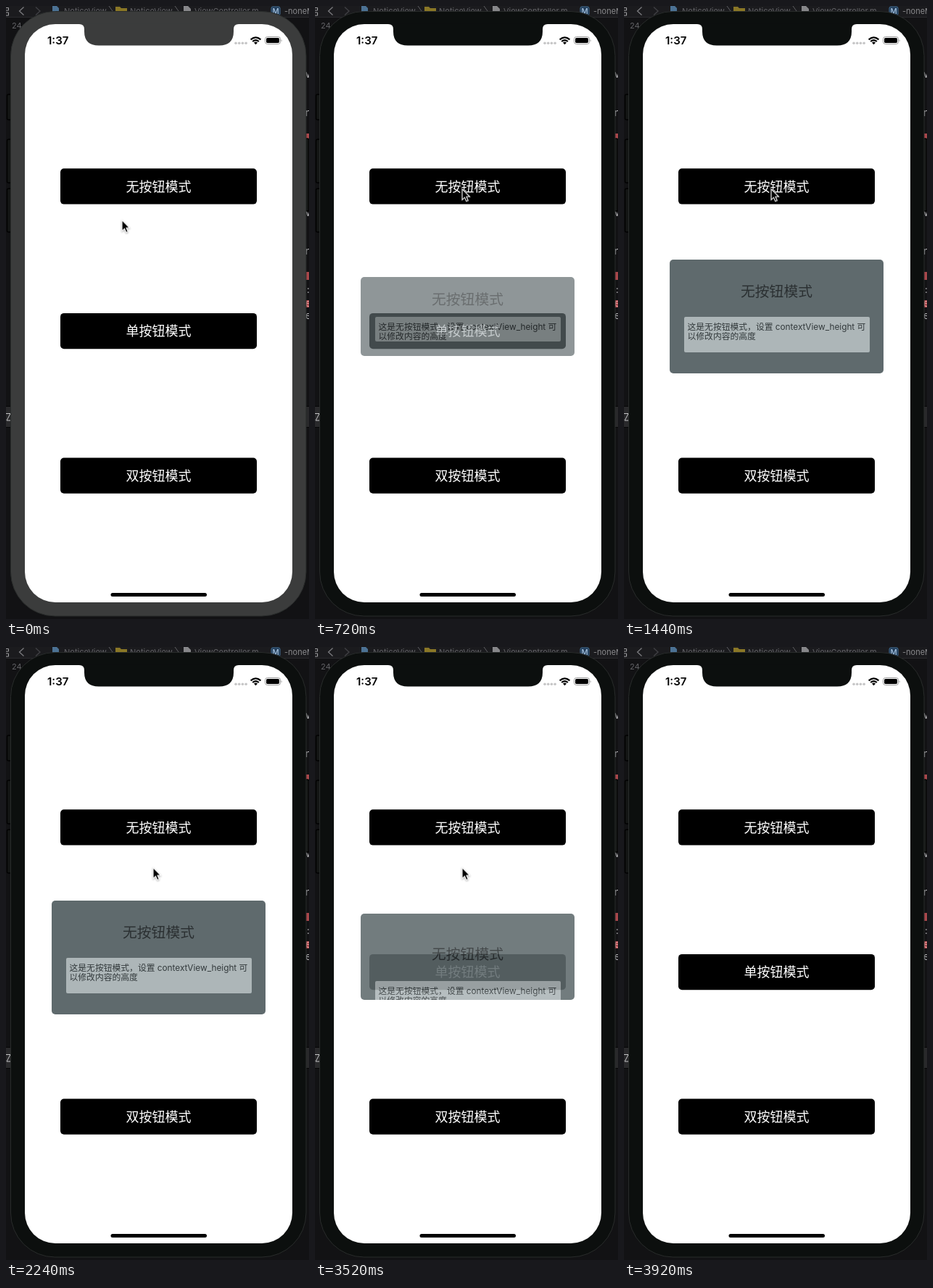
Animation of 418x846 px, one loop 4.16 s. Source, as an HTML page:

```html
<!DOCTYPE html>
<html lang="zh-CN">
<head>
<meta charset="utf-8">
<title>弹窗演示</title>
<style>
html, body { margin: 0; width: 100%; height: 100%; overflow: hidden; background: #121214; }
body { position: relative; font-family: Inter, "Noto Sans CJK SC", "Noto Sans CJK", sans-serif; }
svg { position: absolute; left: 0; top: 0; display: block; }
.bezel, .popup, .title, .content, .cursor { animation: 4160ms step-end infinite; }

.bezel { animation-name: activate; }
@keyframes activate {
  0% { color: #3b3c3c; }
  1.92%, 100% { color: #0c0f0e; }
}

.bar { font-size: 11px; fill: #626266; }
.code { font-size: 13px; fill: #b9b9bc; }
.label { font-size: 18px; fill: #fff; text-anchor: middle; }
.clock { font-size: 15px; font-weight: 600; fill: #000; }

.popup {
  position: absolute; left: 63px; width: 295px;
  overflow: hidden; border-radius: 5px; background: #5f6a6d;
  animation-name: popup;
}
.title {
  position: absolute; left: 0; width: 100%; top: 28%;
  transform: translateY(-50%);
  text-align: center; font-size: 19.8px; font-weight: 500; line-height: 28px;
  color: #2b3032; white-space: nowrap;
  animation-name: title;
}
.content {
  position: absolute; left: 19.5px; width: 256px; top: 50%; height: 31.2%;
  box-sizing: border-box; padding: 8px 0 0 5px; overflow: hidden;
  border-radius: 2px; background: #adb6b8; color: #333a3c;
  font-size: 11.8px; line-height: 13.5px; white-space: nowrap;
  animation-name: content;
}
/* springs open past its height, then collapses while fading */
@keyframes popup {
  0% { top: 428.5px; height: 0; opacity: 0; }
  15.38% { top: 408px; height: 41px; opacity: .3; }
  17.3% { top: 374px; height: 109px; opacity: .7; }
  19.23% { top: 354.5px; height: 148px; opacity: .92; }
  21.15% { top: 349.5px; height: 158px; opacity: 1; }
  23.07% { top: 348.5px; height: 160px; opacity: 1; }
  25% { top: 349.5px; height: 158px; opacity: 1; }
  26.92% { top: 350.3px; height: 157px; opacity: 1; }
  84.61% { top: 368px; height: 119px; opacity: .88; }
  86.53% { top: 392px; height: 68px; opacity: .65; }
  88.46% { top: 408px; height: 34px; opacity: .4; }
  90.38% { top: 417px; height: 14px; opacity: .2; }
  92.3% { top: 421px; height: 5px; opacity: .08; }
  94.23%, 100% { top: 424px; height: 0; opacity: 0; }
}
@keyframes title {
  0% { top: 28%; }
  84.61% { top: 47%; }
  86.53% { top: 90%; }
  88.46%, 100% { top: 180%; }
}
@keyframes content {
  0% { top: 50%; }
  84.61% { top: 78%; }
  86.53%, 100% { top: 100%; }
}

.cursor { overflow: visible; filter: drop-shadow(0 1px 1px rgba(0, 0, 0, .35)); animation-name: cursor; }
@keyframes cursor {
  0% { transform: translate(160px, 295.5px); visibility: visible; animation-timing-function: steps(7); }
  13.46% { transform: translate(203px, 252.5px); animation-timing-function: step-end; }
  40.38% { transform: translate(203px, 252.5px); animation-timing-function: steps(5); }
  50% { transform: translate(203px, 304.5px); visibility: visible; animation-timing-function: step-end; }
  94.23%, 100% { transform: translate(203px, 304.5px); visibility: hidden; }
}
</style>
</head>
<body>
<svg width="418" height="846" viewBox="0 0 418 846">
  <!-- editor behind the phone -->
  <rect width="418" height="846" fill="#121214"/>
  <rect width="418" height="15" fill="#1b1b1e"/>
  <path d="M0 15.5H418" stroke="#29292c"/>
  <rect y="553" width="418" height="28" fill="#29292b"/>
  <path d="M0 552.5H418M0 581.5H418" stroke="#050506"/>
  <path d="M0 2.5H3.5V6H0M0 9H3.5V13H0" fill="none" stroke="#a0a0a3"/>
  <path d="M24.5 1.5L18.5 7L24.5 12.5" fill="none" stroke="#7b7b7f" stroke-width="1.3"/>
  <path d="M41 1.5L47 7L41 12.5" fill="none" stroke="#414145" stroke-width="1.3"/>
  <path d="M64 0H70L73 3V11H64Z" fill="#4c7294"/>
  <path d="M151 1H157L159 3H167V12H151Z" fill="#8a7726"/>
  <path d="M245 0H251L255 4V12H245Z" fill="#87878a"/>
  <path d="M142 0L147 7M233 0L238 7" stroke="#5c5c60"/>
  <g class="bar">
    <text x="80" y="11">NoticeView</text>
    <text x="171" y="11">NoticeView</text>
    <text x="260" y="11">ViewController.m</text>
    <text x="384" y="11" fill="#88888b">-noneM</text>
    <text x="8" y="31">24</text>
  </g>
  <rect x="366" y="1" width="12" height="12" rx="2" fill="#203a55" stroke="#416b91"/>
  <text x="372" y="11" font-size="10" font-weight="600" text-anchor="middle" fill="#9bb9d7">M</text>
  <g class="code">
    <text x="413" y="99">v</text>
    <text x="413" y="152">n</text>
    <text x="413" y="290">v</text>
    <text x="413" y="343">n</text>
    <text x="415" y="396">:</text>
    <text x="413" y="432">e</text>
  </g>
  <path d="M413 176h5v8h-5zM413 367h5v11h-5zM413 406h5v10h-5z" fill="#a9474b"/>
  <text x="413" y="415" font-size="13" fill="#e4a0a0">e</text>
  <path d="M0 562.5H6L1 572H6" fill="none" stroke="#c5c5c7"/>

  <!-- phone -->
  <g fill="#141615" stroke="#020202" stroke-width="1.5">
    <rect x="1.5" y="122" width="8" height="35" rx="2"/>
    <rect x="1.5" y="184" width="8" height="60" rx="2"/>
    <rect x="1.5" y="252" width="8" height="60" rx="2"/>
    <rect x="410" y="183" width="8" height="100" rx="2"/>
  </g>
  <g class="bezel" fill="currentColor">
    <rect x="6.5" y="7.5" width="407.5" height="834.5" rx="61" stroke="#292c2b"/>
    <rect x="26" y="25" width="369" height="798" rx="42" fill="#fff"/>
    <path d="M101 24.5H321V25Q314 25 314 32V35Q314 54.5 294 54.5H128Q108 54.5 108 35V32Q108 25 101 25Z"/>
  </g>

  <!-- status bar -->
  <text class="clock" x="57" y="53">1:37</text>
  <g fill="#c5c5c6">
    <circle cx="317" cy="51.3" r="1.8"/><circle cx="321.7" cy="51.3" r="1.8"/>
    <circle cx="326.4" cy="51.3" r="1.8"/><circle cx="331.1" cy="51.3" r="1.8"/>
  </g>
  <g fill="none" stroke="#000" stroke-width="2.2">
    <path d="M337.6 46.3Q344.5 40.3 351.4 46.3"/>
    <path d="M340.2 49Q344.5 45.2 348.8 49"/>
  </g>
  <path d="M342 50.6Q344.5 48.5 347 50.6L344.5 53.2Z"/>
  <rect x="357.5" y="42.5" width="21" height="10" rx="3" fill="none" stroke="#9b9b9b"/>
  <rect x="359" y="44" width="18" height="7" rx="1.7"/>
  <path d="M379.7 45.5Q381.4 47.5 379.7 49.5Z" fill="#9b9b9b"/>

  <!-- buttons -->
  <g>
    <rect x="75" y="224.3" width="271" height="49.3" rx="5"/>
    <rect x="75" y="423.9" width="271" height="49.3" rx="5"/>
    <rect x="75" y="623.5" width="271" height="49.3" rx="5"/>
  </g>
  <g class="label">
    <text x="210.5" y="255.5">无按钮模式</text>
    <text x="210.5" y="455">单按钮模式</text>
    <text x="210.5" y="654.5">双按钮模式</text>
  </g>
  <rect x="144.5" y="810" width="132.5" height="5" rx="2.5"/>
</svg>

<div class="popup">
  <div class="title">无按钮模式</div>
  <div class="content">这是无按钮模式，设置 contextView_height 可<br>以修改内容的高度</div>
</div>

<svg class="cursor" width="14" height="20">
  <path d="M0 0V15L3.5 11.8L5.8 17L8.3 15.9L6 10.8H10.6Z" stroke="#fff" stroke-width="1.1"/>
</svg>
</body>
</html>
```
